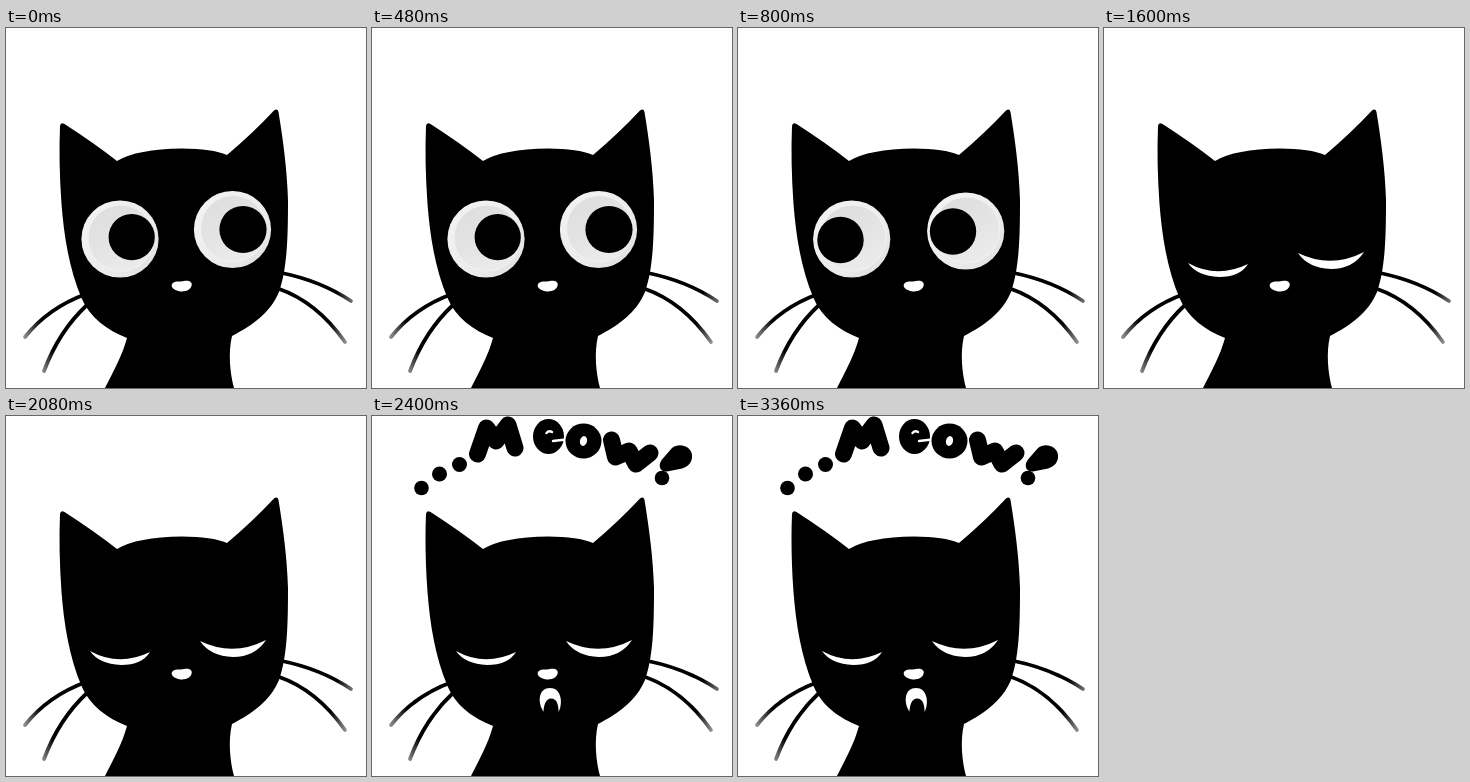
Animation of 360 by 360 pixels, one loop 4 s. Source, as an HTML page:

```html
<!DOCTYPE html>
<html lang="en">
<head>
<meta charset="utf-8">
<title>Meowing cat</title>
<style>
  html, body { margin: 0; width: 100%; height: 100%; overflow: hidden; background: #fff; }
  svg { display: block; width: 100%; height: 100%; }

  .right, .left, .lids, .meow { visibility: hidden; animation: 4s step-end infinite; }
  .right { animation-name: right; }
  .left { animation-name: left; }
  .lids { animation-name: lids; }
  .meow { animation-name: meow; }
  @keyframes right { 0% { visibility: visible; } 20%, 100% { visibility: hidden; } }
  @keyframes left { 0% { visibility: hidden; } 20% { visibility: visible; } 40%, 100% { visibility: hidden; } }
  @keyframes lids { 0% { visibility: hidden; } 40%, 100% { visibility: visible; } }
  @keyframes meow { 0% { visibility: hidden; } 60%, 100% { visibility: visible; } }

  .whiskers { fill: none; stroke: url(#fade); stroke-width: 3.8; stroke-linecap: round; }
  .white { fill: #fff; }
  .fat { fill: none; stroke: #000; stroke-width: 17; stroke-linecap: round; stroke-linejoin: round; }
  .slit { fill: none; stroke: #fff; stroke-width: 2.4; stroke-linecap: round; }
</style>
</head>
<body>
<svg viewBox="0 0 360 360">
  <defs>
    <radialGradient id="fade" gradientUnits="userSpaceOnUse" cx="180" cy="250" r="176">
      <stop offset=".86"/>
      <stop offset="1" stop-color="#aaa"/>
    </radialGradient>
    <linearGradient id="rim" x1="0" y1="0" x2="1" y2="1">
      <stop offset="0" stop-color="#f4f4f4"/>
      <stop offset=".6" stop-color="#ececec"/>
      <stop offset="1" stop-color="#dedede"/>
    </linearGradient>
    <linearGradient id="dish" x1=".2" y1="0" x2=".7" y2="1">
      <stop offset="0" stop-color="#dedede"/>
      <stop offset=".55" stop-color="#e4e4e4"/>
      <stop offset="1" stop-color="#ececec"/>
    </linearGradient>
    <g id="eye">
      <circle r="38.6" fill="url(#rim)"/>
      <circle r="33" cx="1" cy="-1" fill="url(#dish)" stroke="#f2f2f2"/>
    </g>
  </defs>

  <g class="whiskers">
    <path d="M80 266Q42 280 19 309"/>
    <path d="M81 277Q53 303 38 343"/>
    <path d="M276 245Q315 253 345 273"/>
    <path d="M272 260.500Q311 274 339 314"/>
  </g>

  <path d="M54 98Q54.500 94 58.500 96Q88 115 111 133Q131 121 176 120.500Q206 120.500 221 127Q247 105 268 82.500Q271.500 80 272.500 84
    C277 112 281 140 282 172C282 212 281 241 273 264C264 285 247 297 226 308
    C222 325 224 345 228 360H99C108 342 116 328 121 310
    C101 302 84 290 75.500 270C63 240 58 208 55.500 176C53.500 148 53 122 54 98Z"/>

  <path class="white" d="M166 256C168 252.500 174 254 178 253C183 252 187 254 185.500 258C184 262.500 179 263.500 174.500 263.500C168 262.500 164.500 259 166 256Z"/>

  <g class="right">
    <use href="#eye" x="114" y="211"/>
    <use href="#eye" x="226.500" y="201.500"/>
    <circle cx="125.700" cy="209.200" r="23.100"/>
    <circle cx="237" cy="201.500" r="23.600"/>
  </g>

  <g class="left">
    <use href="#eye" x="113.700" y="211"/>
    <use href="#eye" x="227.700" y="203"/>
    <circle cx="102.500" cy="212" r="23.200"/>
    <circle cx="215" cy="203.500" r="23.200"/>
  </g>

  <g class="lids white">
    <path d="M84 235Q113 251 144 236Q136 249 115 249Q93 248 84 235Z"/>
    <path d="M194 225Q227 241 260 224Q249 241 227 241Q204 240 194 225Z"/>
  </g>

  <g class="meow">
    <path class="white" d="M171 295C165 285 167 272 178 272C189 272 191 286 187 295Q184 298 179 298Q174 298 171 295Z"/>
    <path d="M171.500 299C171 289 174 282.500 179 282.500C185 282.500 187 289 186.500 299Z"/>
    <g role="img" aria-label="...Meow!">
      <circle cx="49.500" cy="72" r="7.300"/>
      <circle cx="67.500" cy="58" r="7.500"/>
      <circle cx="87.500" cy="48.500" r="7.500"/>
      <path class="fat" d="M105.500 38L114.500 12L124 25L136 9L143 32"/>
      <ellipse cx="176.500" cy="20.500" rx="15.500" ry="17.500"/>
      <path class="slit" d="M174.500 17Q177 14 180 16M181 25L194 23.500"/>
      <ellipse cx="211.500" cy="25" rx="18" ry="17.500"/>
      <ellipse class="white" cx="211.500" cy="25" rx="3.500" ry="5" transform="rotate(15 211.500 25)"/>
      <path class="fat" d="M239.500 24L243.500 41L257 35L264 48L278 37"/>
      <path d="M300 32C307 26.500 319 30 320 39C321 48 313 53 305 53.500L295 55.500C287 56 286 48.500 290 43.500Z"/>
      <circle cx="290" cy="62" r="7.300"/>
    </g>
  </g>
</svg>
</body>
</html>
```
